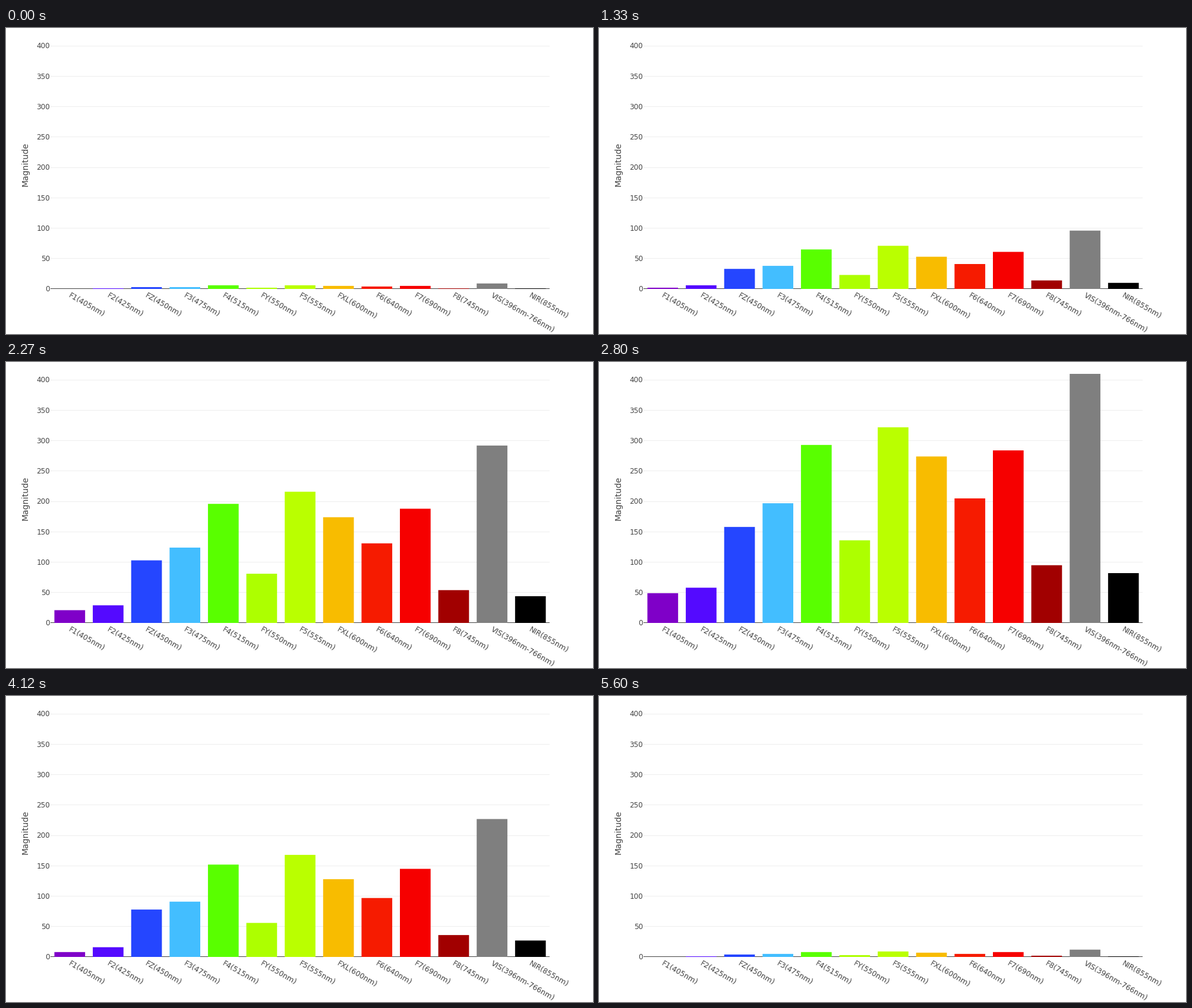
These frames come from a looping animation (988 by 516 pixels, 5.78 s). A matplotlib script:

```python
import numpy as np
import matplotlib.pyplot as plt
from matplotlib.animation import FuncAnimation
from matplotlib.patches import Rectangle

W, H, DPI = 988, 516, 100
LOOP, STEP = 5780, 20
LEFT, WIDTH, TOP, BASE = 75, 840, 20, 440
Y_MAX = 410
UNIT = (BASE - TOP) / Y_MAX
PITCH = WIDTH / 13
INK = "#444444"
KNEE = 0.42     # lamp level above which weak channels catch up
TICK = 133      # ms between screen refreshes
PACE = 1.54     # refreshes per sensor reading

plt.rcParams["font.family"] = "DejaVu Sans"

# name, colour, gain in dim light, reading at full light
CHANNELS = [
    ("F1(405nm)", "#7f00c8", 13, 62),
    ("F2(425nm)", "#540aff", 30, 72),
    ("FZ(450nm)", "#2546ff", 173, 185),
    ("F3(475nm)", "#43beff", 198, 232),
    ("F4(515nm)", "#59ff00", 338, 340),
    ("FY(550nm)", "#adff00", 120, 163),
    ("F5(555nm)", "#baff00", 373, 373),
    ("FXL(600nm)", "#f8bc00", 280, 323),
    ("F6(640nm)", "#f61b00", 213, 241),
    ("F7(690nm)", "#f60000", 320, 330),
    ("F8(745nm)", "#a10000", 75, 114),
    ("VIS(396nm-766nm)", "#7f7f7f", 505, 505),
    ("NIR(855nm)", "#000000", 54, 100),
]

# Lamp brightness over time: slow rise, plateau, quick fall
LAMP = [
    (0, 0.017), (532, 0.055), (1064, 0.18), (1330, 0.191), (1729, 0.32),
    (1862, 0.434), (2527, 0.675), (2793, 0.863), (2926, 0.95),
    (3192, 0.981), (3724, 1), (4123, 0.45), (4389, 0.083), (4540, 0.083),
    (4921, 0.017), (5586, 0.024),
]
LAMP_T, LAMP_L = zip(*LAMP)
READ_AT = TICK * np.ceil(PACE * np.arange(28))


def reading(dim, full, lamp):
    boost = max(0, lamp - KNEE) / (1 - KNEE)
    return min(round(dim * lamp + (full - dim) * boost), Y_MAX)


def box(x, y, w, h, color, z):
    patch = Rectangle((x, y), w, h, facecolor=color, linewidth=0,
                      snap=False, zorder=z)
    return ax.add_patch(patch)


def label(x, y, s, px, **kw):
    ax.text(x, y, s, fontsize=px * 72 / DPI, color=INK, va="baseline",
            rotation_mode="anchor", **kw)


fig = plt.figure(figsize=(W / DPI, H / DPI), dpi=DPI, facecolor="white")
ax = fig.add_axes([0, 0, 1, 1])
ax.set_xlim(0, W)
ax.set_ylim(H, 0)
ax.axis("off")

for v in range(0, 401, 50):
    y = BASE - v * UNIT
    box(LEFT, np.ceil(y - 1), WIDTH, 1, "#eeeeee" if v else INK, 1)
    label(74, y + 4.2, str(v), 12, ha="right")

label(37, 229.5, "Magnitude", 14, ha="center", rotation=90)

bars = []
for i, (name, color, dim, full) in enumerate(CHANNELS):
    x = LEFT + i * PITCH
    bars.append(box(x + 0.1 * PITCH, BASE, 0.8 * PITCH, 0, color, 2))
    label(x + PITCH / 2 - 3, 453.2, name, 12.4, ha="left", rotation=-30)


def draw(k):
    ms = k * STEP + STEP / 2
    lamp = np.interp(READ_AT[READ_AT <= ms][-1], LAMP_T, LAMP_L)
    for bar, (_, _, dim, full) in zip(bars, CHANNELS):
        height = reading(dim, full, lamp) * UNIT
        bar.set_y(BASE - height)
        bar.set_height(height)
    return bars


anim = FuncAnimation(fig, draw, frames=LOOP // STEP, interval=STEP,
                     init_func=lambda: draw(0), repeat=True, repeat_delay=0)
plt.show()
```
